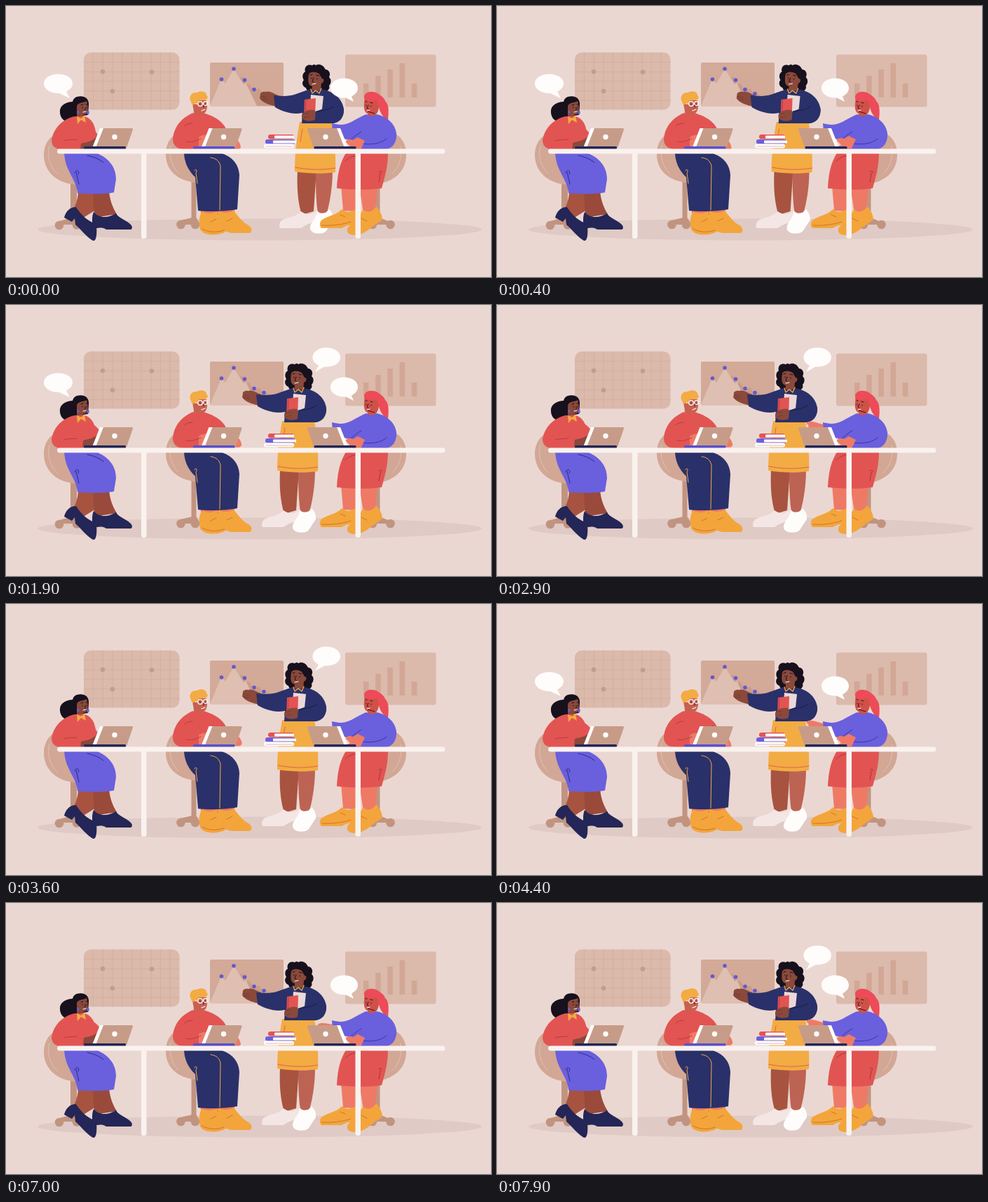
Animation, 692 px wide and 388 px high, one loop 8 s. Source, as an HTML page:

```html
<!DOCTYPE html>
<html lang="en">
<head>
<meta charset="utf-8">
<title>Team meeting</title>
<style>
html, body { margin: 0; width: 100%; height: 100%; overflow: hidden; background: #ebd7d1; }
svg { display: block; width: 692px; height: 388px; }
.line { fill: none; stroke-linecap: round; stroke-linejoin: round; }
.red { fill: #e25452 } .purple { fill: #6a5fdd } .navy { fill: #2a3069 } .boot { fill: #232656 }
.gold { fill: #f3ab43 } .shoe { fill: #f3a53b } .hair { fill: #17111d } .dark { fill: #8a493b }
.brown { fill: #a75340 } .skin { fill: #c8604f } .coral { fill: #ee7a66 } .white { fill: #fffdfc }
.chair { fill: #d2a795 } .metal { fill: #c19480 } .board { fill: #dbb9ab }
</style>
</head>
<body>
<svg viewBox="0 0 692 388">
  <rect width="692" height="388" fill="#ebd7d1"/>
  <ellipse cx="362" cy="320" rx="317" ry="15.5" fill="#dfcac5"/>

  <rect class="board" x="111" y="66.500" width="136.500" height="82" rx="10"/>
  <path id="grid" class="line" stroke="#d1ac9c" stroke-width=".7"/>
  <g fill="#c69b88"><circle cx="138" cy="94" r="3.300"/><circle cx="208" cy="94.500" r="3.300"/><circle cx="152" cy="122" r="3.300"/></g>

  <rect x="291" y="81" width="105" height="62.500" rx="2" fill="#d3a998"/>
  <path fill="#c99d8a" d="M325 90L333 103 337 101 343 112 347 111 354 122 361 118 368 128 374 126 384 143H338Z"/>
  <path fill="#dfbfb2" d="M291 143L307 105 313 111 325 90 339 112 342 110 358 143Z"/>
  <g id="chartDots" fill="#6358cf"></g>

  <rect class="board" x="484" y="69.500" width="129.500" height="75" rx="3"/>
  <g id="bars" fill="#d2a795"></g>

  <!-- chairs -->
  <g id="chairLeft">
    <path class="metal" d="M92 245H101V303L105 311H87L92 303Z"/>
    <circle class="metal" cx="76" cy="314" r="6.300"/><circle class="metal" cx="101" cy="313.500" r="6.300"/>
    <path class="metal" d="M76 308L94 303 102 308V313H76Z"/>
    <path class="chair" d="M80 181C64 183 54 196 54 213C54 238 74 256 105 256L112 210Z"/>
    <path class="line" stroke="#e2c0b2" d="M62 200C58 216 63 231 73 240"/>
  </g>
  <g>
    <path class="metal" d="M264.500 245H271.500V303L276 311H257L264.500 303Z"/>
    <path class="metal" d="M249 307L266 303 274 307V313H249Z"/>
    <circle class="metal" cx="249.500" cy="313" r="6.300"/><circle class="metal" cx="270" cy="313" r="6.300"/>
    <path class="chair" d="M252 181C238 182 228 194 228 212C228 237 246 252 279 254L286 210Z"/>
    <path class="line" stroke="#e2c0b2" d="M235 200C232 216 237 231 246 239"/>
  </g>
  <g>
    <path class="metal" d="M526 245H533.500V303L545 308V313H520L526 303Z"/>
    <circle class="metal" cx="523" cy="313" r="6.300"/><circle class="metal" cx="548.500" cy="313" r="6.300"/>
    <path class="chair" d="M546 180C562 183 571 195 571 213C571 238 552 254 521 256L515 210Z"/>
    <path class="line" stroke="#e2c0b2" d="M563 201C566 216 561 231 551 240"/>
  </g>

  <!-- presenter -->
  <g id="presenter">
    <path class="brown" d="M391 236H418L414 294 397 299C391 280 390 258 391 236Z"/>
    <path fill="#bd6354" d="M417 236H441C441 260 437 281 433 296L420 297C417 275 417 256 417 236Z"/>
    <path fill="#f4e6e4" d="M396 294C390 301 380 302 370 306C365 309 364 314 366 318H396C401 314 408 311 416 309L419 292C411 301 403 299 396 294Z"/>
    <path class="white" d="M419 293C419 304 408 310 409 319C411 327 427 328 432 322C436 316 439 311 442 307C443 301 440 295 436 291C431 298 424 299 419 293Z"/>
    <path class="gold" d="M394 166H440C444 190 446 214 445 238C427 241 405 240 387 237C387 212 390 188 394 166Z"/>
    <path class="line" stroke="#e0624a" stroke-width="1" d="M388 231C407 235 428 235 445 232M398 176L395 194"/>
    <path class="dark" d="M364 128C357 126 352 121 346 123C340 122 337 125 338 128L337 132C340 137 347 141 361 144Z"/>
    <path class="line" stroke="#6d352d" stroke-width=".7" d="M338 129L347 131M339 133L347 134"/>
    <path class="hair" d="M412 85C405 82 400 88 402 94C397 97 398 103 400 106C396 110 399 116 403 117C404 123 411 123 415 121L429 122C433 123 438 119 436 114C440 110 439 104 436 102C439 97 436 91 431 91C428 84 421 82 417 85C415 83 414 84 412 85Z"/>
    <path class="dark" d="M407 98C408 94 416 93 422 97L426 104C429 103 430 109 425 111L424 123H411L412 115C405 114 406 105 407 98Z"/>
    <path class="line" stroke="#17111d" stroke-width="1" d="M409 99L412 98M418 99L422 100M411 103V104M419 104V105M414 103L412 108 414 109"/>
    <path class="line" stroke="#fff" stroke-width="1" d="M412 112L417 111"/>
    <path class="navy" d="M410 119C402 121 397 123 389 126C378 130 367 129 357 128L359 145C370 151 383 156 398 153L397 168H439C452 168 458 158 457 147C455 133 443 122 425 119C420 123 414 123 410 119Z"/>
    <path class="line" stroke="#f3ab43" stroke-width="1.300" d="M410 119L412 125 417 121 422 125 425 118"/>
    <path fill="#ead9d8" d="M410 127L428 129 425 158 408 158Z"/>
    <path class="red" d="M401 134L417 132 416 162 400 161Z"/>
    <path class="line" stroke="#b83c42" stroke-width="1" d="M403 135L402 160"/>
    <path class="dark" d="M397 156C400 150 407 148 415 149L419 154 416 163C409 166 400 165 397 160Z"/>
    <path class="line" stroke="#6d352d" stroke-width=".7" d="M399 155L406 153M400 160L407 158"/>
    <path class="navy" d="M417 151L444 141 457 147C457 160 451 168 439 168L416 164Z"/>
    <path class="line" stroke="#181d4c" stroke-width="1" d="M418 151C427 150 437 148 443 144"/>
  </g>

  <!-- woman on the left -->
  <g>
    <path class="brown" d="M103 264H129L128 292 104 307 93 297C99 287 103 277 103 264Z"/>
    <path fill="#9a4a3b" d="M124 264H147C148 278 152 288 158 298L126 303Z"/>
    <path class="boot" d="M100 288C92 287 85 294 83 303L94 309 98 304 99 313C107 320 115 331 124 336C129 337 130 328 129 312C119 309 109 302 100 288Z"/>
    <path class="boot" d="M125 295C134 305 146 303 157 297C161 304 171 306 178 313C181 316 180 320 178 320H143C137 316 130 318 124 319C123 311 122 302 125 295Z"/>
    <path class="purple" d="M83 209H125C146 216 157 230 157 248L154 267C136 270 119 269 102 268C100 246 84 237 83 209Z"/>
    <path class="line" stroke="#302b84" stroke-width="1" d="M116 214C125 216 133 219 139 224M98 239C100 233 106 236 103 241M100 238L104 255"/>
    <path class="hair" d="M101 130C112 127 119 133 118 142L117 156 104 158C101 162 96 163 92 165C82 167 76 159 77 149C78 141 88 137 95 137C96 133 98 131 101 130Z"/>
    <path class="dark" d="M101 143C104 137 111 139 115 136C117 143 118 150 114 155L110 156 111 163H101Z"/>
    <path class="line" stroke="#17111d" stroke-width="1" d="M107 142L110 141M114 141H116M109 145V146M115 145V146M113 146V149"/>
    <path class="line" stroke="#fff" stroke-width="1" d="M110 152L114 151"/>
    <ellipse class="purple" cx="117" cy="152.500" rx="1.700" ry="3"/><ellipse class="purple" cx="103" cy="152" rx="1.300" ry="2.500"/>
    <path class="red" d="M98 158C81 162 68 174 65 192C65 200 70 205 79 205H128C131 198 130 185 126 172C123 163 117 159 111 158Z"/>
    <path class="gold" d="M101 158L102 169 107 163 114 167 112 157 107 161Z"/>
    <path class="line" stroke="#b53b43" stroke-width="1" d="M83 193C88 191 93 192 101 191"/>
    <g id="typingLeft">
      <path class="red" d="M116 167C125 168 131 174 137 183L130 198 111 190Z"/>
      <path class="dark" d="M111 193C119 191 128 190 135 181L140 179 139 188 130 202H110Z"/>
    </g>
  </g>

  <!-- man -->
  <g>
    <path class="coral" d="M278 288H303V300H278ZM304 288H326V299H304Z"/>
    <path class="shoe" d="M280 294C275 300 275 311 277 320C282 328 295 329 306 326C312 325 316 322 314 318C307 312 302 304 301 294C294 298 286 298 280 294Z"/>
    <path class="shoe" d="M303 293C301 304 305 315 311 322L321 325H348C352 323 351 317 346 314C338 310 331 301 325 293C317 297 310 297 303 293Z"/>
    <path class="line" stroke="#cf7429" stroke-width="1" d="M292 309L300 305M315 308L323 304M280 319C288 324 300 325 311 321"/>
    <path class="navy" d="M254 209H300C321 213 332 225 333 242L330 291C315 294 291 295 274 293L270 245C260 236 254 223 254 209Z"/>
    <path class="line" stroke="#f3ab43" stroke-width="1" d="M292 217C299 218 304 221 306 229L305 292M269 236C270 232 274 235 271 239L273 254"/>
    <path class="skin" d="M266 135H286C288 143 287 152 282 154L280 161H269Z"/>
    <path class="gold" d="M264 137C260 131 264 123 272 124C279 120 287 123 286 128C290 130 287 136 280 135C274 134 272 139 271 145C267 145 265 141 264 137Z"/>
    <circle class="skin" cx="270" cy="143.500" r="3.300"/>
    <g class="line" stroke="#fff" stroke-width="1.200"><circle cx="277" cy="140" r="3.300"/><circle cx="284.500" cy="139.500" r="2.800"/><path d="M270 140H274M279 150L284 148"/></g>
    <path class="line" stroke="#27192a" stroke-width="1" d="M277 140V141M284 140V141M282 142V145"/>
    <path class="red" d="M267 153C250 160 239 174 238 191C238 200 245 205 254 205H316V184C315 169 300 158 281 153C276 157 271 157 267 153Z"/>
    <path class="line" stroke="#b53b43" stroke-width="1" d="M255 172C258 169 262 168 266 168M308 174L315 184"/>
    <path class="coral" d="M275 188C282 183 289 184 294 188L290 204H275Z"/>
    <path class="line" stroke="#b53b43" stroke-width="1" d="M257 194C264 196 271 193 278 190"/>
    <g id="typingMan"><path class="coral" d="M312 187L323 194 330 189C334 190 336 194 337 200L334 203H318Z"/></g>
  </g>

  <!-- woman on the right -->
  <g>
    <path class="coral" d="M478 257H503L499 294 481 293ZM504 257H530L527 293 510 298Z"/>
    <path class="shoe" d="M479 291C472 299 460 300 451 306C447 309 447 315 450 318H479C485 314 493 313 501 311L500 290C493 296 486 296 479 291Z"/>
    <path class="shoe" d="M509 291C505 302 495 308 488 317C485 323 488 327 495 328C505 329 515 323 524 315L537 306C537 299 533 292 528 287C523 295 516 297 509 291Z"/>
    <path class="line" stroke="#cf7429" stroke-width="1" d="M477 299L484 302M507 304L515 308M451 314C464 315 480 313 492 309"/>
    <path class="red" d="M486 209H545C545 230 541 243 536 261C513 264 491 263 472 261C473 241 476 224 486 209Z"/>
    <path class="line" stroke="#a7353e" stroke-width="1" d="M484 222C490 216 497 214 505 214M532 238C535 234 538 238 534 240L532 252"/>
    <path fill="#ec4b57" d="M511 130C512 122 523 121 530 125C534 128 539 130 541 136C547 141 546 153 545 163C538 160 534 153 532 145L512 141Z"/>
    <path fill="#cf5147" d="M512 133C516 138 524 136 529 135L532 144C532 150 529 154 526 158H515L516 154C510 152 510 143 512 133Z"/>
    <path class="line" stroke="#27192a" stroke-width="1" d="M513 137H515M520 138L523 139M514 142V143M521 143V144M517 142L515 146 517 147M516 151L526 154"/>
    <path class="line" stroke="#fff" stroke-width="1" d="M515 150L519 149"/>
    <g id="gesture"><path class="coral" d="M468 171C459 171 453 166 445 167C440 168 441 171 445 172C442 173 445 176 451 176L468 178Z"/></g>
    <path class="purple" d="M514 155C504 159 496 165 488 168C480 171 473 170 465 168L466 181C474 187 483 191 492 192L490 205H543C553 203 558 193 557 182C555 168 543 158 529 155C523 159 518 158 514 155Z"/>
    <path class="line" stroke="#3e369f" stroke-width="1" d="M493 190C498 186 502 183 507 180M508 197C522 199 535 197 543 190"/>
    <g id="typingRight"><path class="coral" d="M512 191L506 204H481L491 199 485 193C485 189 491 188 495 190L502 186Z"/></g>
  </g>

  <!-- books -->
  <rect class="red" x="374" y="184" width="37" height="6.500" rx="3"/><rect class="white" x="383" y="185.500" width="28" height="4" rx="1"/>
  <rect class="purple" x="370" y="191" width="43" height="6.500" rx="3"/><rect class="white" x="381" y="192.500" width="33" height="4" rx="1"/>
  <rect class="white" x="368" y="197.500" width="43" height="6" rx="3"/><path class="line" stroke="#d9b9c0" stroke-width="1" d="M371 201H409"/>

  <!-- laptops -->
  <g id="laptop">
    <path class="white" d="M134 175H140L130 203H123Z"/>
    <path fill="#c69c89" d="M139 175H179Q181.500 175 181 177L172 203H128Z"/>
    <circle class="white" cx="155" cy="187.500" r="3.700"/>
  </g>
  <use href="#laptop" x="155.500"/>
  <use href="#laptop" transform="matrix(-1 0 0 1 611 0)"/>
  <rect class="boot" x="111" y="201" width="60" height="4" rx="1.500"/>
  <rect fill="#5a50cb" x="267" y="201" width="59.500" height="4" rx="1.500"/>
  <rect class="boot" x="439.500" y="201" width="60" height="4" rx="1.500"/>

  <!-- table -->
  <g fill="#f9f2ef">
    <rect x="193" y="207" width="7.500" height="126" rx="3"/>
    <rect x="498.500" y="207" width="7.500" height="126" rx="3"/>
    <rect x="73" y="204.500" width="553.500" height="7" rx="3.500"/>
  </g>

  <g class="white">
    <path id="bubbleLeft" d="M91 132L76 125C63 125 54 119 54 111C54 103 63 97.500 74.500 97.500S95 103 95 111C95 116 91 120 86 122.500Z"/>
    <path id="bubbleRight" d="M496 137L485 131.500C472 132 463 126 463 117.500C463 109 472 103.500 482.500 103.500S502 109 502 117.500C502 123 498 127 493 129.500Z"/>
    <path id="bubbleTop" d="M441 96L446 86.500C441 84 437.500 80 437.500 75C437.500 67 446 61 457 61S477 67 477 75C477 84 467 89 454 88.500Z"/>
  </g>
</svg>
<script>
const LOOP = 8000;
const $ = id => document.getElementById(id);
const clamp = v => Math.max(0, Math.min(1, v));
const smooth = v => { v = clamp(v); return v * v * (3 - 2 * v); };

let gridPath = "";
for (let x = 124.5; x < 247; x += 13.7) gridPath += `M${x} 66.500V148.500`;
for (let y = 80.5; y < 148; y += 13.7) gridPath += `M111 ${y}H247.500`;
$("grid").setAttribute("d", gridPath);

$("chartDots").innerHTML = [[307.500, 105], [325, 90], [340.500, 106], [354, 119.500], [368, 125.500]]
  .map(([x, y]) => `<circle cx="${x}" cy="${y}" r="2.800"/>`).join("");
$("bars").innerHTML = [111, 100, 91, 82, 111]
  .map((y, i) => `<rect x="${510 + i * 17.2}" y="${y}" width="7.500" height="${131 - y}"/>`).join("");

// Visible spans [start, end] in ms and the tail tip each bubble grows from.
const bubbles = [
  { id: "bubbleLeft", tip: [91, 132], spans: [[-500, 2300], [4000, 6000]] },
  { id: "bubbleRight", tip: [496, 137], spans: [[-500, 2300], [4000, 5100], [6700, 9000]] },
  { id: "bubbleTop", tip: [441, 96], spans: [[1400, 4000], [7500, 9000]] }
];
const POP = 200;

function move(id, x, y, turn = "") {
  $(id).setAttribute("transform", `translate(${x} ${y}) ${turn}`);
}

// 0..1 wave with its low point at the given phase.
function wave(t, period, low) {
  return smooth(0.5 - 0.5 * Math.cos(2 * Math.PI * (t / period - low)));
}

function draw(t) {
  const slide = 1 - clamp(t / 700);
  move("presenter", 25 * slide * slide, 0);

  const left = 1 - wave(t, 520, 0.48);
  move("typingLeft", -4 * (1 - left), 4 * (1 - left));
  const man = 1 - wave(t, 1000, 0.22);
  move("typingMan", -3 * man, 4 * man);
  move("typingRight", 0, 2 * wave(t, 1000, 0.5));

  const phase = (t / 1800) % 1;
  const drop = phase < 0.5 ? 1 - smooth((phase - 0.2) / 0.17) : smooth((phase - 0.83) / 0.16);
  move("gesture", 12 * drop, 9 * drop, `rotate(${-20 * drop} 468 175)`);

  for (const { id, tip: [x, y], spans } of bubbles) {
    const size = Math.max(...spans.map(([a, b]) => smooth((t - a) / POP) * smooth((b - t) / POP)));
    $(id).setAttribute("transform", `translate(${x} ${y}) scale(${size}) translate(${-x} ${-y})`);
  }
}

const start = performance.now();
function tick() {
  draw((performance.now() - start) % LOOP);
  requestAnimationFrame(tick);
}
draw(0);
requestAnimationFrame(tick);
</script>
</body>
</html>
```
